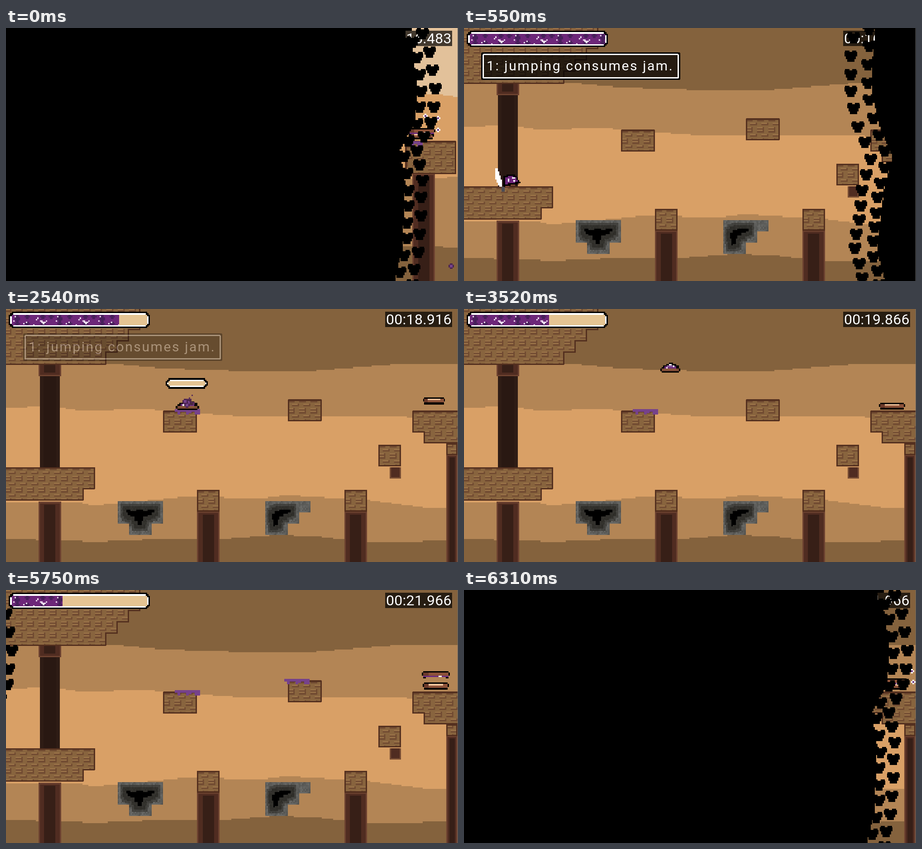
Recreate the animation shown at these times as an HTML page. Size 999 by 561 pixels, loop 6380 ms.

```html
<!DOCTYPE html>
<html lang="en">
<head>
<meta charset="utf-8">
<title>Jam jump</title>
<style>
html, body { margin: 0; width: 100%; height: 100%; overflow: hidden; background: #000; }
svg { display: block; width: 100%; height: 100%; }
text { font-family: Roboto, sans-serif; fill: #fff; white-space: pre; }
</style>
</head>
<body>
<svg id="stage" viewBox="0 0 999 561" preserveAspectRatio="none" shape-rendering="crispEdges"></svg>
<script>
const LOOP = 6380, STEP = 69.33, S = 3.131;
const DARK = '#84623d', MID = '#b38555', LIGHT = '#d9a066', JAM = '#76428a';
const { sin, cos, PI, round, floor } = Math;
const lerp = (a, b, p) => a + (b - a) * p;
const clamp = (v, a, b) => Math.min(b, Math.max(a, v));
const repeat = (count, make) => Array.from({ length: count }, (_, i) => make(i)).join('');
const snap = v => +(round(v / S) * S).toFixed(2);

let seed = 7;
const rnd = (a = 0, b = 1) => lerp(a, b, (seed = seed * 16807 % 2147483647) / 2147483647);
const pick = (a, b) => floor(rnd(a, b));

const rect = (x, y, w, h, fill, extra = '') =>
  `<rect x="${x}" y="${y}" width="${w}" height="${h}" fill="${fill}" ${extra}/>`;
const path = (d, fill, extra = '') => `<path d="${d}" fill="${fill}" ${extra}/>`;
const at = (x, y, inner, sx = 1, rot = 0) =>
  `<g transform="translate(${x} ${y})scale(${S})rotate(${rot})scale(${sx} 1)">${inner}</g>`;

// Linear interpolation through key points x0, y0, x1, y1, ...
function curve(pts, x) {
  let i = 0;
  while (i < pts.length - 4 && pts[i + 2] < x) i += 2;
  const p = (x - pts[i]) / (pts[i + 2] - pts[i]);
  return lerp(pts[i + 1], pts[i + 3], clamp(p, 0, 1));
}

// Background layer with a stepped upper edge
function band(fill, ...pts) {
  let d = 'M0 561';
  for (let x = 0; x < 999; x += S) d += `V${snap(curve(pts, x))}H${(x + S).toFixed(2)}`;
  return path(d + 'V561Z', fill);
}

const brick = d => path(d, 'url(#brick)', 'stroke="#54301f" stroke-linejoin="round"');
const block = (x, y, w, h) => brick(`M${x + .5} ${y + .5}h${w - 1}v${h - 1.4}h${1 - w}z`);
const pillar = (x, y, w) => rect(x, y, w, 190 - y, '#6d4230') +
  rect(x + 1, y + 1, w - 2, 190, '#502c21') + rect(x + w / 4, y + 2, w / 2, 190, '#371f17');

function defs() {
  const pattern = (id, w, h, inner) =>
    `<pattern id="${id}" width="${w}" height="${h}" patternUnits="userSpaceOnUse">${inner}</pattern>`;
  const course = y => {
    const x = y % 2 ? 0 : 3;
    return rect(x, y - 1, 4, 1, '#997248') + rect(x, y, 5, 1, '#704a31') + rect(x + 4, y - 1, 1, 1, '#704a31');
  };
  const stone = repeat(64, i => {
    const g = pick(82, 108);
    return rect(i % 8, i >> 3, 1, 1, `rgb(${g},${g},${g - 3})`);
  });
  const lumps = repeat(9, () => {
    const x = pick(0, 27), y = pick(0, 7);
    return rect(x, y + 1, 4, 1, '#47205a') + rect(x + 1, y, 2, 3, '#47205a');
  });
  const seeds = repeat(17, () => rect(pick(0, 29), pick(0, 9), pick(1, 2.4), 1, '#f3e6f5'));
  return '<defs>' +
    pattern('brick', 8, 8, rect(0, 0, 8, 8, '#88643e') + course(1) + course(4) + course(7)) +
    pattern('stone', 8, 8, stone) +
    pattern('jam', 30, 9, rect(0, 0, 30, 9, '#6d2779') + lumps + seeds) + '</defs>';
}

function rock(shape, hole) {
  const glow = w => path(hole, 'none', `stroke="#17130f" stroke-opacity=".38" stroke-width="${w}"`);
  return path(shape, 'url(#stone)') + glow(8) + glow(5) + path(hole, '#000');
}

const world = inner => `<g transform="translate(-3.6 0)scale(${S})">${inner}</g>`;

function level() {
  return rect(0, 0, 999, 561, DARK) +
    band(MID, 0, 122, 240, 122, 340, 131, 470, 136, 660, 138, 870, 122, 999, 121) +
    band(LIGHT, 0, 219, 100, 216, 165, 226, 300, 222, 520, 238, 999, 240) +
    band(MID, 165, 430, 190, 436, 410, 415, 550, 421, 620, 413, 800, 424, 920, 440) +
    band(DARK, 0, 510, 200, 516, 345, 510, 480, 510, 600, 501, 690, 505, 800, 518, 999, 513) +
    world(
      rect(25, 47, 14, 65, '#2e1c15') + rect(27.5, 47, 9, 65, '#291812') +
      rect(24, 39, 16, 8.5, '#6d4230') + rect(25, 39, 14, 7.5, '#502c21') + rect(28, 39, 8, 6, '#371f17') +
      pillar(24, 136.5, 16) + pillar(136, 143.5, 16) + pillar(240, 143.5, 16) + pillar(312, 103, 8) +
      brick('M-2-2H95.5V14.5H87.5V22.5H79.5V30.5H71.5V39H-2Z') +
      brick('M-2 112.5H63.5V127.3H55.5V135.2H-2Z') +
      block(112, 72, 24, 16) + block(200, 64, 24, 16) + block(264, 96, 16, 16) +
      block(136, 128, 16, 16) + block(240, 128, 16, 16) + block(312, 95, 8, 9) +
      brick('M288.5 72.5H324V94.8H296.5V87H288.5Z') +
      rect(272, 112, 8, 8, '#774c33') + rect(273, 112, 6, 7, '#502c21') +
      rock('M80 136h32v16h-8v8h-16v-8h-8z',
        'M86 142h3v1h4v-1h5v1h3v-1h5v2h-2v2h-3v1h-3v3h-1v3h-3v-3h-2v-3h-3v-1h-2v-2h-1z') +
      rock('M184 136h32v8h-8v8h-8v8h-16z',
        'M191 143h3v-1h8v2h-2v1h-3v2h-3v2h-1v4h-2v1h-1v-5h-1v-4h2z'));
}

// Right-hand end of the preceding level
function before() {
  return rect(800, 0, 199, 561, LIGHT) + path('M800 0H999V153H988V150H966V147H930V140H800Z', '#e2c19a') +
    path('M800 335H947V333H975V330H999V561H800Z', MID) +
    path('M800 484H966V487H999V561H800Z', DARK) +
    world(pillar(288, 103, 16) + block(283, 80, 36, 24)) +
    at(893, 254, splat) + at(918, 247, sandwich) +
    spark(927, 195) + spark(955, 226) + spark(955, 200) + crumb(984, 528, 3);
}

const splat = rect(-9, -1, 18, 2, JAM) + repeat(9, i => rect(i * 2 - 9, 0, 2, 1 + pick(0, 3), JAM));
const bread = path('M-6-4h12v1h1v2h-1v1h-12v-1h-1v-2h1z', '#000') + rect(-6, -3, 12, 2, '#7d4a35') +
  rect(-5, -3, 9, 1, '#8c5a3d');
const dome = path('M-5-4v-1h2v-1h2v-1h3v1h2v1h2v1z', '#000') + rect(-4, -4.4, 8, 1.4, '#6d2d7c') +
  rect(-2.5, -5.2, 5, 1.5, '#8a5a9c') + rect(-1, -6, 2, 1, '#fff') + rect(-3, -4, 1, 1, '#fff') + rect(2, -5, 1, 1, '#fff');
const spread = path('M-4-7h2v-1h6v1h1v1h1v2h1v1h1v1h-1v1h-4v1h-4v1h-3z', '#000') +
  path('M-3-6h2v-1h4v1h2v2h1v1h-2v1h-5v1h-2z', '#6d2779') + path('M-3 0h4v-1h5v-1h1v1h-3v1h-4v1h-3z', '#7d4a35') +
  rect(-1, -5, 1, 2, '#fff') + rect(2, -6, 2, 1, '#fff') + rect(3, -4, 1, 1, '#fff');
const knife = path('M-9.4-12h2v2h1v3h1v3h1v5h-2v-1h-1v-2h-1v-2h-1z', '#fff') + rect(-4.8, 1, 2.4, 3.4, '#4d4d55');

const goal = low => path('M-8-5h16v1h1v2h-1v2h-16v-2h-1v-2h1z', '#000') +
  rect(-8, -4, 16, 2.6, '#8c5239') + rect(-8, -4, 3, 2.6, '#6b3a2a') + rect(-5, -4, 10, 1, low > .95 ? '#a9a098' : '#efc29a');
const lid = path('M-9-5h18v1h1v2h-1v2h-2v-1h-14v1h-2v-2h-1v-2h1z', '#000') + rect(-9, -4, 18, 2.4, '#8c5239') +
  rect(-9, -4, 4, 2.4, '#6b3a2a') + rect(-9, -1.8, 18, 1, '#6d2d7c') + rect(2, -2, 2, 1, '#fff');
const sandwich = goal(0) + `<g transform="translate(0 -3)">${lid}</g>`;

const spark = (x, y) => at(x, y, path('M-.5-1.5h1v1h1v1h-1v1h-1v-1h-1v-1h1z', '#fff') + rect(-.5, -.5, 1, 1, JAM));
const crumb = (x, y, size) => at(x, y, size > 2
  ? path('M-1-2h2v1h1v2h-1v1h-2v-1h-1v-2h1z', '#4b2450') + rect(-1, -1, 2, 2, JAM)
  : rect(-size / 2, -size / 2, size, size, size < 1 ? JAM : '#4b2840'));

// Pill shape with stepped corners
const pill = (x, y, w, h) => `M${x + 2} ${y}h${w - 4}v1h1v1h1v${h - 4}h-1v1h-1v1h${4 - w}v-1h-1v-1h-1v${4 - h}h1v-1h1z`;
const gauge = (x, y, w, h, fill) => path(pill(x, y, w, h), '#000') +
  path(pill(x + 1, y + 1, w - 2, h - 2), '#fff') +
  rect(x + 2, y + 2, w - 4, h - 4, '#e5c493') + rect(x + 2, y + 2, fill, h - 4, 'url(#jam)');

// Each hop: take-off and landing step, both ends, extra height, turn in the air
const hop = (a, b, x0, y0, x1, y1, h, turn) => ({ a, b, x0, y0, x1, y1, h, turn });
const hops = [
  hop(27.5, 36.6, 98, 349, 401, 224, 120, 0),
  hop(48.5, 59.5, 401, 224, 643, 199, 110, 0),
  hop(71.5, 80.5, 643, 199, 950, 196, 170, 180)
];
const drops = Array.from({ length: 10 }, () => ({ vx: rnd(-43, 28), vy: rnd(-40, -8), size: rnd(.6, 2.2) }));

function splash({ b, x1, y1 }, n) {
  const t = n - b;
  if (t < 0 || t > 13) return '';
  const puff = t < 2 ? at(x1 + 3, y1 - 20 - t * 4, path('M-2-1h2v-1h1v1h1v2h2v2h-1v-1h-2v1h-1v-1h-2zM-4 1h1v1h-1zM2-4h1v1h-1z', '#5b2f58')) : '';
  return puff + drops.map(d => crumb(x1 + d.vx * t, y1 - 8 + d.vy * t + 8 * t * t, d.size)).join('');
}

function actors(n) {
  const bob = cos((n - 25) / 28 * 2 * PI), last = hops[2];
  const next = hops.find(h => n < h.b), done = hops.filter(h => n >= h.b);
  const landed = done.at(-1);
  let out = done.filter(h => h !== last).map(h => at(h.x1, h.y1 + 1, splat)).join('');
  out += at(n < last.a ? 946 : last.x1, n < last.b ? 217.5 + 6.5 * bob : 221, goal(bob), (53 + 5 * bob) / 56);

  if (!next) {
    out += at(last.x1, lerp(last.y1, 212, clamp((n - 84) / 2, 0, 1)), lid);
  } else if (n >= next.a) {
    const p = (n - next.a) / (next.b - next.a);
    const y = lerp(next.y0, next.y1, p) - 4 * next.h * p * (1 - p);
    out += at(lerp(next.x0, next.x1, p), y, bread + dome, 1, next.turn * p);
  } else if (n < 13) {
    out += at(100, 350, spread) + at(98 + 4 * Math.max(0, n - 8), 349, knife);
  } else {
    const squash = landed ? lerp(1.2, 1.05, clamp((n - landed.b) / 3, 0, 1)) : 1;
    out += at(next.x0, next.y0, bread + dome, squash);
    if (n >= 17) {
      const charge = clamp(1 - (next.a - n) / 9.5, 0, 1);
      out += at(next.x0 - 1.5, next.y0 - 59, gauge(-15, -3.7, 30, 7.4, round(charge * 26)));
    }
  }
  if (n >= 88) out += spark(990, 180) + spark(993, 204);
  return out + splash(hops[0], n) + splash(hops[1], n);
}

function hud(n) {
  const used = hops.filter(h => n >= h.a).length;
  const ticks = clamp(1087 + round(4.03 * (n - 25)), 989, 1318);
  const ms = floor(ticks * 1000 / 60);
  const clock = `00:${floor(ms / 1000)}.${String(ms % 1000).padStart(3, '0')}`;
  const note = clamp(1 - (n - 29) / 11.5, 0, 1);
  const frame = (x, y, w, h, color) =>
    rect(x, y, w, h, 'none', `rx="2" stroke="${color}" stroke-width="3"`);
  return at(0, 0, gauge(2, 2, 99.6, 11.4, Math.min(95.6, 96 - 20 * used))) +
    `<g opacity="${note}">` + rect(38, 54, 440, 61, '#000', 'rx="3" fill-opacity=".72"') +
    frame(39.5, 55.5, 437, 58, '#000') + frame(42.5, 58.5, 431, 52, '#fff') +
    '<text x="50" y="94" font-size="30" letter-spacing="2.6">1: jumping consumes jam.</text></g>' +
    rect(838, 6, 148, 34, '#000', 'fill-opacity=".7"') +
    `<text x="840" y="34" font-size="32" letter-spacing=".3">${clock}</text>`;
}

// Wipe edge: sideways shape, heights of the outer blobs, depth of the inner blobs and of the solid part
const lead = {
  shape: [15, -20, 43, -5, 137, 9, 211, 0, 271, -32, 340, -20, 490, -26, 555, -42],
  outer: i => 22 + 36 * i + 9 * sin((i - 2) * 2 * PI / 9.5),
  inner: i => 30 + 36.5 * i, depth: -30, solid: -38, far: -60
};
const trail = {
  shape: [22, 5, 65, 0, 149, 0, 218, 16, 284, 44, 357, 25, 490, 10, 555, 26],
  outer: i => 22 + 36 * i + 17 * sin(i * PI / 13),
  inner: i => trail.outer(i + .5), depth: 37, solid: 48, far: 1060
};
const blob = path('M-4-4h3v1h2v-1h3v1h.5v3h-1v2h-1v2h-5v-2h-1v-2h-1v-3h.5z', '#000');

function wipe(edge, x) {
  const side = y => x + curve(edge.shape, y);
  let d = `M${edge.far} 0`;
  for (let y = 0; y < 561; y += S) d += `H${snap(side(y) + edge.solid)}V${(y + S).toFixed(2)}`;
  const column = (height, depth) => repeat(17, k => {
    const y = height(k - 1);
    return at(snap(side(y) + depth), snap(y), blob);
  });
  return path(d + `H${edge.far}Z`, '#000') + column(edge.outer, 0) + column(edge.inner, edge.depth);
}

function curtain(n) {
  if (n === 0) return wipe(lead, 940);
  if (n < 11) return wipe(trail, 855 + (n - 8) * 121);
  return n > 81 ? wipe(lead, 3 + (n - 83) * 121) : '';
}

// The picture advances in even steps after the opening pose
const stepAt = t => t < 68 ? 0 : 1 + floor((t - 42) / STEP);

const stage = document.getElementById('stage');
stage.innerHTML = defs() + `<g>${level()}</g><g></g>` + rect(998, 0, 1, 561, '#666');
const live = stage.children[2];
let shown = -1, start;

function draw(now) {
  start ??= now;
  const n = stepAt((now - start) % LOOP);
  if (n !== shown) {
    shown = n;
    live.innerHTML = (n ? actors(n) : before()) + hud(n) + curtain(n);
  }
  requestAnimationFrame(draw);
}
requestAnimationFrame(draw);
</script>
</body>
</html>
```
